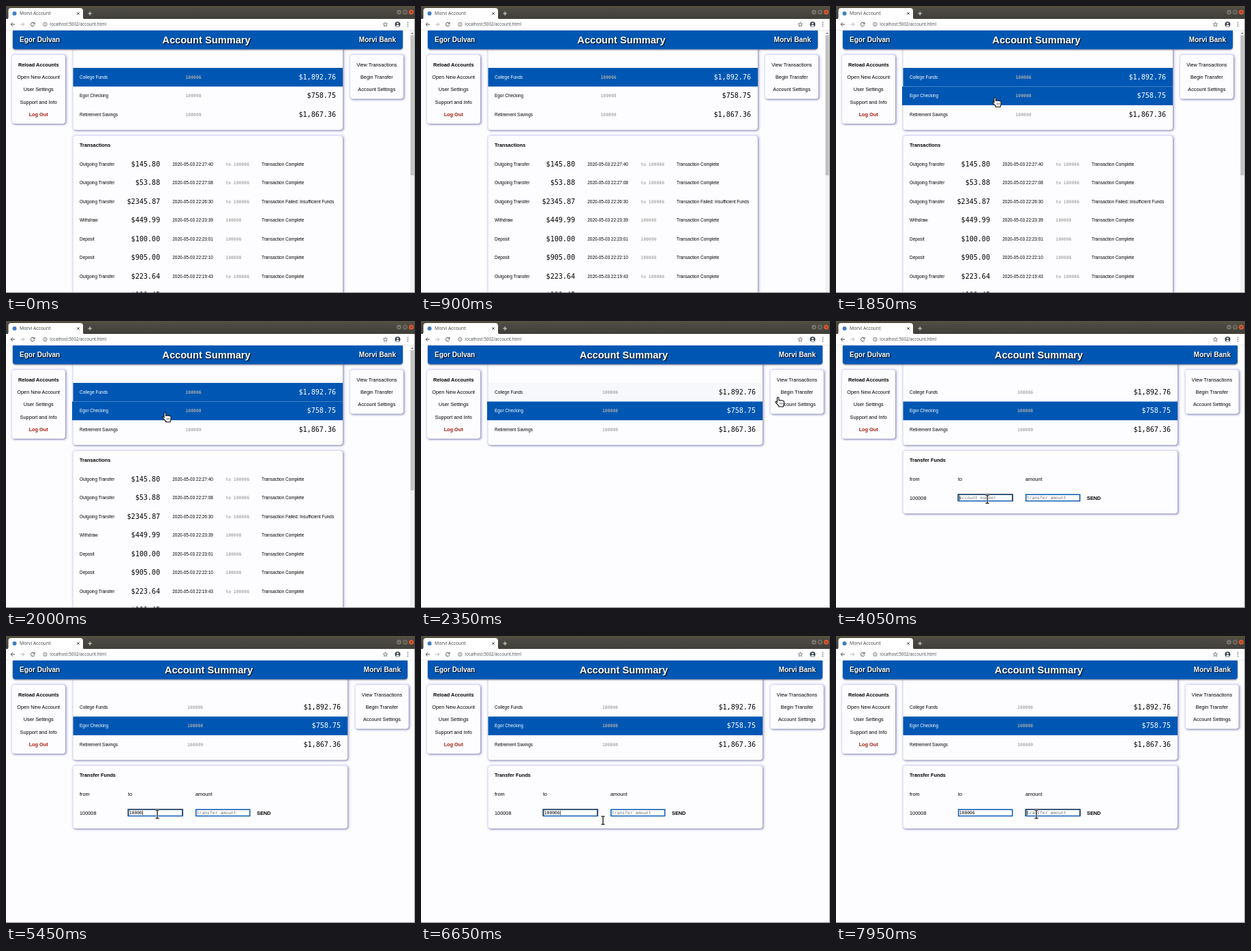
Animation, 600 px wide and 422 px high, one loop 8 s. Source, as an HTML page:

```html
<!DOCTYPE html>
<html lang="en">
<head>
<meta charset="utf-8">
<title>Account summary</title>
<style>
  html, body { margin: 0; width: 100%; height: 100%; overflow: hidden; background: #fdfdff; }
  svg { display: block; width: 600px; height: 422px; }
  text { font: 7.33px "Liberation Sans", Arial, sans-serif; fill: #000; white-space: pre; }
  .small { font-size: 6.41px; }
  .bold { font-weight: bold; }
  .logout { font-weight: bold; fill: #a8180c; }
  .money { font: 10.07px "DejaVu Sans Mono", monospace; }
  .number { font: bold 6.41px "DejaVu Sans Mono", monospace; fill: #aaa; }
  .field { font: 6.41px "DejaVu Sans Mono", monospace; }
  .hint { fill: #757575; }
  .tab { font: 6.8px "Open Sans", sans-serif; fill: #3c4043; }
  .url { font: 6.28px "Open Sans", sans-serif; fill: #45484c; }
  .brand { font-size: 10.07px; }
  .title { font-size: 14.65px; }
  .brand, .title { font-weight: bold; fill: #fff; text-shadow: 1px 1px 1.5px #000; }
  .lit text { fill: #fff; }
  .glow { fill: #dfdffb; filter: blur(.9px); }
  .panel { fill: #fdfdff; filter: drop-shadow(1px 1px 1.2px #8c8ca8); }
  .header { fill: #0057b3; filter: drop-shadow(.6px 1.2px 1.2px #70708c); }
  .line { fill: none; stroke: #4a4d51; stroke-width: 1; }
</style>
</head>
<body>
<svg id="stage" viewBox="0 0 600 422"></svg>
<script>
const LOOP = 8000, BLUE = '#0057b3', ROW = 27.45;

const text = (x, y, s, cls = '', anchor = 'start') =>
  `<text x="${x}" y="${y}" class="${cls}" text-anchor="${anchor}">${s}</text>`;
const rect = (x, y, w, h, attrs = '') =>
  `<rect x="${x}" y="${y}" width="${w}" height="${h}" ${attrs}/>`;
const group = (id, body, attrs = '') => `<g id="${id}" ${attrs}>${body}</g>`;
const panel = (x, y, w, h) =>
  rect(x - 1.5, y - 2.2, w + 5, h + 5, 'rx="6" class="glow"') + rect(x, y, w, h, 'rx="4" class="panel"');

const accounts = [
  ['College Funds', '100006', '$1,892.76'],
  ['Egor Checking', '100008', '$758.75'],
  ['Retirement Savings', '100009', '$1,867.36'],
];
const DONE = 'Transaction Complete';
const transactions = [
  ['Outgoing Transfer', '$145.80', '22:27:40', 'to 100006', DONE],
  ['Outgoing Transfer', '$53.88', '22:27:08', 'to 100006', DONE],
  ['Outgoing Transfer', '$2345.87', '22:26:30', 'to 100006', 'Transaction Failed: Insufficient Funds'],
  ['Withdraw', '$449.99', '22:23:39', '100008', DONE],
  ['Deposit', '$100.00', '22:23:01', '100006', DONE],
  ['Deposit', '$905.00', '22:22:10', '100008', DONE],
  ['Outgoing Transfer', '$223.64', '22:19:43', 'to 100006', DONE],
  ['Outgoing Transfer', '$199.45', '22:18:20', 'to 100006', DONE],
];

function accountRows(name, right) {
  return accounts.map(([label, number, amount], i) => {
    const y = 104.4 + i * ROW, top = 91 + i * ROW;
    const words = text(108, y + 2.3, label, 'small') + text(right - 10, y + 3.5, amount, 'money', 'end');
    return words +
      group(name + 'Row' + i, rect(98.5, top, right - 98.5, ROW, `fill="${BLUE}"`) + words, 'class="lit" opacity="0"') +
      group(name + 'Edge' + i, rect(97, top, 2, ROW, `fill="${BLUE}"`), 'opacity="0"') +
      text(right === 494 ? 263.5 : 266, y + 2.3, number, 'number');
  }).join('');
}

// Everything whose place depends on the page width
function page(name, right, extra) {
  const shift = right - 494, side = 505 + shift * 1.1, middle = side + 38.8;
  const left = ['Reload Accounts', 'Open New Account', 'User Settings', 'Support and Info', 'Log Out'];
  const tools = ['View Transactions', 'Begin Transfer', 'Account Settings'];
  const style = ['bold', '', '', '', 'logout'];
  return panel(98.5, 50, right - 98.5, 132.3) + accountRows(name, right) +
    panel(9, 72, 78, 101) + left.map((s, i) => text(47.7, 88.6 + i * 18.3, s, style[i], 'middle')).join('') +
    panel(side, 72, 78, 64.5) + tools.map((s, i) => text(middle, 88.6 + i * 18.3, s, '', 'middle')).join('') +
    extra +
    `<path class="header" d="M10 36H${582 + shift}V59.5q0 4-4 4H14q-4 0-4-4Z"/>` +
    text(20, 53.4, 'Egor Dulvan', 'brand') +
    text(294 + shift / 2, 55.2, 'Account Summary', 'title', 'middle') +
    text(572 + shift, 53.4, 'Morvi Bank', 'brand', 'end');
}

function history() {
  return panel(98.5, 191, 395.5, 260) + text(108, 207.4, 'Transactions', 'bold') +
    transactions.map(([kind, amount, time, number, status], i) => {
      const y = 232.5 + i * ROW;
      return text(108, y + 2.3, kind, 'small') + text(226, y + 3.5, amount, 'money', 'end') +
        text(244.3, y + 2.3, '2020-05-03 ' + time, 'small') + text(322.3, y + 2.3, number, 'number') +
        text(375, y + 2.3, status, 'small');
    }).join('') +
    rect(593, 36, 6, 386, 'fill="#f1f1f1"') + rect(593.5, 43, 5, 206, 'fill="#c1c1c1"') +
    '<path d="M594.3 41l1.7-2 1.7 2Z" fill="#666"/>';
}

const input = (id, x) =>
  rect(x + .7, 255.2, 79, 9.4, `fill="#fff" stroke="#1562b5" stroke-width="1.6"`) +
  group(id + 'Focus', `<path d="M${x} 265V254.9H${x + 80.3}V265" fill="none" stroke="#3f4652" stroke-width="1.3"/>`) +
  text(x + 1.7, 262.3, '', 'field').replace('<text', `<text id="${id}Text"`) +
  rect(x + 2, 256.6, .6, 6.8, `id="${id}Caret"`);

const transfer = panel(98.5, 191, 402.5, 92) + text(108, 207.4, 'Transfer Funds', 'bold') +
  ['from', 'to', 'amount'].map((s, i) => text([108, 179, 278][i], 235, s)).join('') +
  text(108, 262.5, '100008') + input('to', 179) + input('sum', 278) + text(368, 262.5, 'SEND', 'bold');

const beginHover =
  group('beginFill', rect(511, 95.3, 79, 18.3, `fill="${BLUE}"`) +
    text(551.5, 106.9, 'Begin Transfer', '', 'middle'), 'class="lit"') +
  group('beginEdge', rect(511, 95.3, 1.8, 18.3, `fill="${BLUE}"`));

const dot = (x, y, r, fill) => `<circle cx="${x}" cy="${y}" r="${r}" fill="${fill}"/>`;
const browser =
  rect(0, 0, 600, 19.5, 'fill="url(#bar)"') +
  '<path d="M1 19.5q2.5 0 2.5-3V7q0-4 4-4H109q4 0 4 4v9.500q0 3 2.500 3Z" fill="#fff"/>' +
  rect(0, 19, 600, 17, 'fill="#fff"') + rect(0, 35.4, 600, .6, 'fill="#dfe0e4"') +
  dot(12.5, 11, 3, '#3f7fc0') + text(20, 13.3, 'Morvi Account', 'tab') +
  '<path class="line" d="M104.200 9.200l3.600 3.600m0-3.600l-3.600 3.600"/>' +
  '<path class="line" stroke-width="1.2" style="stroke:#e4e2dc" d="M120.300 11h5.800m-2.900-2.900v5.800"/>' +
  dot(576.5, 9, 3.5, '#777368') + dot(585.5, 9, 3.5, '#777368') + dot(594.5, 9, 3.5, '#e4572d') +
  '<path class="line" style="stroke:#34332e;stroke-width:.8" d="M575 9.500h3M584.200 7.800h2.600v2.400h-2.600ZM593.300 7.800l2.400 2.400m0-2.400l-2.400 2.400"/>' +
  '<path class="line" d="M13 27H7.200m2.600-2.700L7.100 27l2.700 2.700"/>' +
  '<path class="line" style="stroke:#b4b6b9" d="M21 27h5.800m-2.600-2.700L26.900 27l-2.700 2.700"/>' +
  '<path class="line" d="M41.300 25.200a2.800 2.800 0 1 0 .6 2.500M42 23.800v2.300h-2.300"/>' +
  '<path class="line" style="stroke-width:.7" d="M60.100 27a2.700 2.700 0 1 1-5.400 0a2.700 2.700 0 1 1 5.400 0M57.400 26.600v2M57.400 25.200v.7"/>' +
  text(64.3, 29.2, 'localhost:5002/account.html', 'url') +
  '<path class="line" style="stroke-width:.7" d="M556.500 23.800l.9 2.200 2.300.2-1.800 1.500.6 2.300-2-1.200-2 1.200.6-2.300-1.800-1.500 2.300-.2Z"/>' +
  dot(574.5, 27, 4, '#3c4652') + dot(574.5, 25.8, 1.4, '#fff') +
  '<path d="M571.800 29.300q2.700-2.600 5.400 0q-2.700 2.400-5.400 0" fill="#fff"/>' +
  [24.2, 27, 29.8].map(y => dot(589.5, y, .75, '#4a4d51')).join('') +
  rect(599.3, 19, .7, 403, 'fill="#6b6a66"') + rect(0, 421, 600, 1, 'fill="#85858a"');

// Pointers have their hot spot at 0,0
const pointers =
  group('arrow', '<path d="M0 0V11l2.600-2.300L4.300 12.500l2-.9-1.700-3.700H8Z" fill="#111" stroke="#fff" stroke-width=".8"/>') +
  group('hand', '<path d="M-1 1q0-1.400 1.200-1.400T1.400 1V4.200q1-.8 2 .1q1-.7 2 .2q1-.5 2 .3q1.500-.2 1.700 1.400v3.200q-.2 1.500-1 2.500v1.600H1.400v-1.200L-3.200 7.400q-.7-1.400.7-1.700L-1 7Z" fill="#fff" stroke="#111" stroke-width="1.1"/><path d="M3.400 7.500v2.500m1.900-2.500V10m1.900-2.500V10" stroke="#111" stroke-width=".6"/>') +
  group('beam', ['#fff', '#333'].map((c, i) =>
    `<path d="M-2.600-5.800H-.8L0-5.200.8-5.800H2.600M0-5.200V5.400M-2.600 6H-.8L0 5.400.8 6H2.600" fill="none" stroke="${c}" stroke-width="${i ? 1.5 : 2.6}"/>`).join(''));

document.getElementById('stage').innerHTML =
  '<defs><linearGradient id="bar" x2="0" y2="1"><stop stop-color="#56523f"/><stop offset=".25" stop-color="#4c4a43"/><stop offset="1" stop-color="#3f3e39"/></linearGradient></defs>' +
  rect(0, 0, 600, 422, 'fill="#fdfdff"') +
  group('before', page('before', 494, history())) +
  group('after', page('after', 501, group('form', transfer) + beginHover)) +
  browser + group('pointer', pointers);

const el = id => document.getElementById(id);
const show = (id, on) => el(id).setAttribute('visibility', on ? 'inherit' : 'hidden');
const alpha = (id, value) => el(id).setAttribute('opacity', value);
const ease = p => p * p * (3 - 2 * p);
const ramp = (t, a, b) => ease(Math.min(1, Math.max(0, (t - a) / (b - a))));

// time, x, y
const path = [
  [900, 330, 432], [1500, 236, 142], [1750, 233, 135], [2050, 233, 135], [2350, 523.5, 112.5],
  [2650, 536, 107], [3050, 536, 107], [3750, 222, 262], [6150, 222, 262],
  [6650, 267, 271], [7100, 284, 268], [7500, 294, 262], [LOOP, 294, 262],
];
function pointerAt(t) {
  const i = Math.max(1, path.findIndex(step => step[0] >= t));
  const [t0, x0, y0] = path[i - 1], [t1, x1, y1] = path[i];
  const p = ramp(t, t0, t1);
  return [x0 + (x1 - x0) * p, y0 + (y1 - y0) * p];
}

const SELECT = 2050, OPEN = 2800, FOCUS = 3850, NEXT = 7700;
const keys = [4500, 4750, 4950, 5150, 5350, 5650];

function field(id, value, hint, focused, blink) {
  const node = el(id + 'Text');
  node.textContent = value || hint;
  node.classList.toggle('hint', !value);
  show(id + 'Focus', focused);
  show(id + 'Caret', focused && blink);
  el(id + 'Caret').setAttribute('transform', `translate(${value.length * 3.86})`);
}

function draw(t) {
  const chosen = t >= SELECT;
  show('before', !chosen);
  show('after', chosen);
  alpha('beforeRow0', 1);
  alpha('beforeRow1', ramp(t, 1450, 1700));
  alpha('beforeEdge1', t >= 1500 ? 1 : 0);
  alpha('afterRow0', 1 - ramp(t, SELECT, 2380));
  alpha('afterRow1', 1);
  alpha('afterEdge1', t < 2400 ? 1 : 0);

  show('form', t >= OPEN);
  alpha('beginFill', ramp(t, 2450, 2700) - ramp(t, 2880, 3120));
  alpha('beginEdge', t >= 2450 && t < 3120 ? 1 : 0);

  const typed = '100006'.slice(0, keys.filter(k => t >= k).length);
  const active = t >= NEXT ? 'sum' : t >= FOCUS ? 'to' : '';
  const since = t - (active === 'sum' ? NEXT : Math.max(FOCUS, ...keys.filter(k => k <= t)));
  const blink = since % 1000 < 500;
  field('to', typed, 'account number', active === 'to', blink);
  field('sum', '', 'transfer amount', active === 'sum', blink);

  const kind = t < 1450 ? 'arrow' : t < 3120 ? 'hand' : t < 3600 ? 'arrow' : 'beam';
  for (const id of ['arrow', 'hand', 'beam']) show(id, id === kind);
  show('pointer', t >= 900);
  el('pointer').setAttribute('transform', `translate(${pointerAt(t)})`);
}

const start = performance.now();
function tick() {
  draw((performance.now() - start) % LOOP);
  requestAnimationFrame(tick);
}
tick();
</script>
</body>
</html>
```
